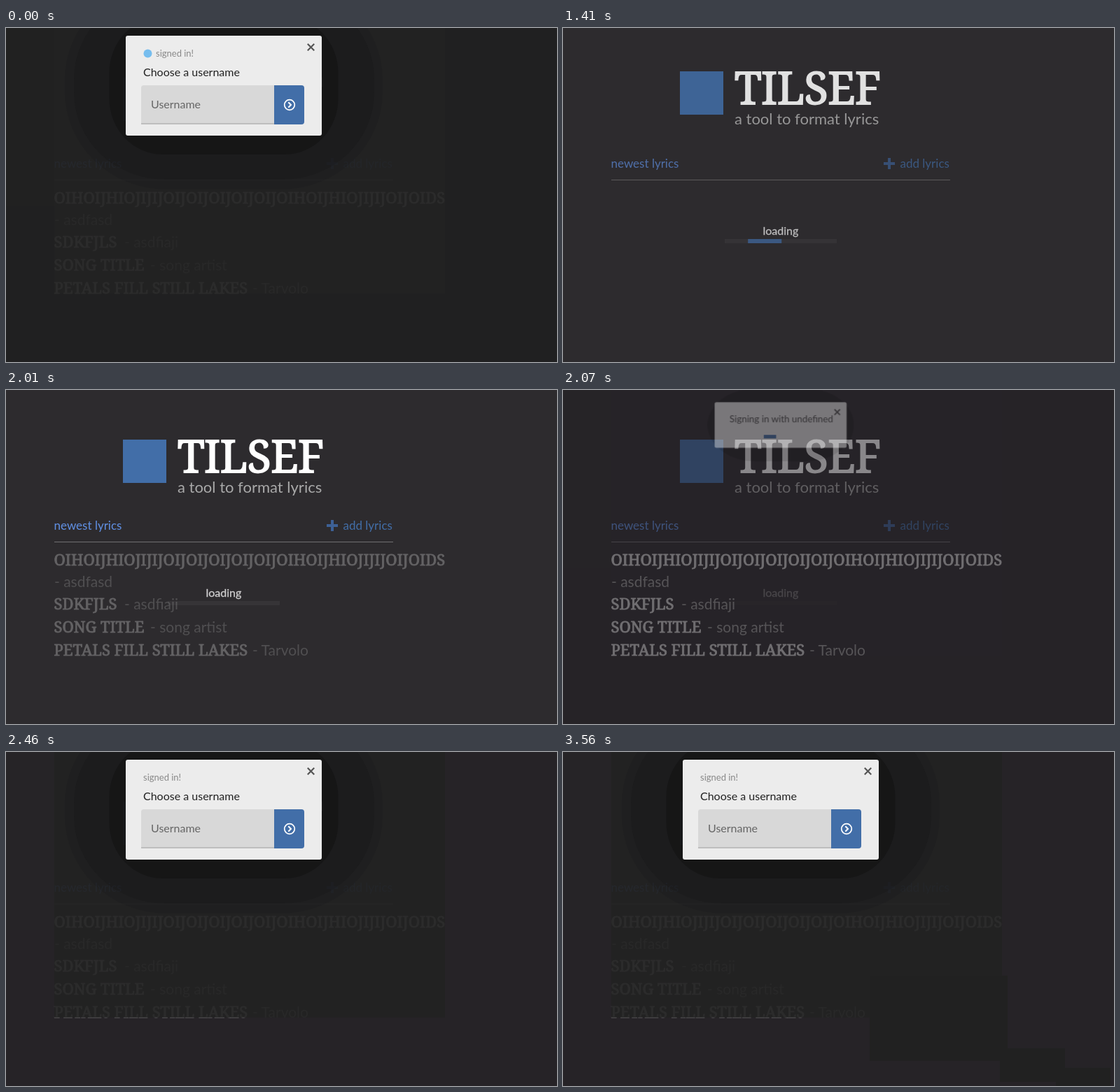
An HTML page for the animation above (4490 ms loop, 787 px wide and 478 px high).

```html
<!DOCTYPE html>
<html lang="en">
<head>
<meta charset="utf-8">
<title>Lyrics sign-in</title>
<style>
html, body { margin: 0; width: 100%; height: 100%; overflow: hidden; background: #2d2b2e; }
svg { display: block; width: 787px; height: 478px; font-family: Lato, sans-serif; font-size: 16px; }
svg * { animation: 4.49s linear infinite; }

.brand { font: 63px "Noto Serif", serif; letter-spacing: -.5px; fill: #fff; stroke: #fff; stroke-width: 1.8px; }
.tag { font-size: 22px; fill: #a9a9a9; }
.row { font-size: 17px; }
.song { font: 22px "Noto Serif", serif; fill: #d3d3d3; stroke: #d3d3d3; stroke-width: .9px; }
.artist { font-size: 21px; fill: #999; }
.blue { fill: #426ea8; }
.icon { fill: none; stroke: #555; stroke-width: 2.2px; }

#header { animation-name: drop; }
#bar { animation-name: appear; }
#loader { animation-name: load; }
#block { animation-name: slide; }
#songs { animation-name: list; }
#shade { animation-name: shade; }
#edge { animation-name: edge; }
#signing { animation-name: signing; transform-origin: 311px 50px; }
#halo { animation-name: halo; }
#fill { animation-name: fill; transform-origin: 282px 70px; }
#choose { animation-name: choose; transform-origin: 311px 82px; }
#badge, #status, #cursor, .trail { animation-timing-function: step-end; }
#badge { animation-name: badge; }
#status { animation-name: status; }
#cursor { animation-name: cursor; }
.trail { fill: #212121; }
#t1 { animation-name: trail1; }
#t2 { animation-name: trail2; }
#t3 { animation-name: trail3; }

@keyframes drop {
  0%, 23.6% { opacity: 1; transform: none; }
  23.61%, 25.61% { opacity: 0; transform: translateY(-64px); animation-timing-function: ease-out; }
  34.08%, 100% { opacity: 1; transform: none; }
}
@keyframes appear {
  0%, 23.6% { opacity: 1; }
  23.61%, 25.61% { opacity: 0; }
  34.08%, 100% { opacity: 1; }
}
@keyframes load {
  0%, 25.61% { opacity: 0; }
  34.08%, 44.1% { opacity: 1; }
  46.1%, 46.98% { opacity: .34; }
  47.88%, 100% { opacity: 0; }
}
@keyframes slide {
  0%, 23.61% { transform: translateX(-48px); }
  42.76%, 44.1% { transform: translateX(151px); }
  44.11%, 100% { transform: translateX(160px); }
}
@keyframes list {
  0%, 23.6% { opacity: 1; }
  23.61%, 44.1% { opacity: 0; }
  46.1%, 46.98% { opacity: .95; }
  47.88%, 100% { opacity: 1; }
}
@keyframes shade {
  0%, 23.6% { opacity: .94; fill: #212121; }
  23.61%, 45.21% { opacity: 0; fill: #201e22; }
  46.1%, 46.98% { opacity: .53; fill: #201e22; }
  47%, 47.88% { opacity: .75; fill: #212121; }
  48.77%, 100% { opacity: .94; fill: #212121; }
}
@keyframes edge {
  0%, 23.6% { opacity: .94; fill: #212121; }
  23.61%, 45.21% { opacity: 0; fill: #201e22; }
  46.1%, 100% { opacity: .53; fill: #201e22; }
}
@keyframes signing {
  0%, 45.21% { opacity: 0; transform: scale(.7); }
  46.1%, 46.98% { opacity: .42; transform: scale(.836); }
  47% { opacity: .75; transform: scale(.95); }
  48.77%, 50.33% { opacity: 1; transform: none; }
  52.5%, 100% { opacity: 0; transform: none; }
}
@keyframes halo {
  0%, 46.98% { opacity: 0; }
  48.77%, 100% { opacity: 1; }
}
@keyframes fill {
  0%, 45.21% { transform: scaleX(0); }
  46.1%, 46.98% { transform: scaleX(.44); }
  48.77%, 49.44% { transform: none; }
  51.5%, 100% { transform: scaleX(1.2); }
}
@keyframes choose {
  0%, 23.6% { opacity: 1; transform: none; }
  23.61%, 50.33% { opacity: 0; transform: scale(.8); animation-timing-function: ease-out; }
  54.78%, 100% { opacity: 1; transform: none; }
}
@keyframes badge { 0% { opacity: 1; } 23.61%, 100% { opacity: 0; } }
@keyframes status { 0% { transform: translateX(18px); } 23.61%, 100% { transform: none; } }
@keyframes cursor {
  0% { opacity: 0; transform: translate(269px, 50px); }
  69.26% { opacity: 1; transform: translate(269px, 50px); }
  70.27% { opacity: 1; transform: translate(270px, 56px); }
  71.27% { opacity: 1; transform: translate(273px, 72px); }
  72.27% { opacity: 1; transform: translate(278px, 102px); }
  73.28% { opacity: 1; transform: translate(287px, 154px); }
  74.28% { opacity: 1; transform: translate(361px, 205px); }
  75.28% { opacity: 1; transform: translate(438px, 320px); }
  76.28% { opacity: 1; transform: translate(623px, 423px); }
  77.28% { opacity: 1; transform: translate(705px, 451px); }
  78.29% { opacity: 1; transform: translate(769px, 466px); }
  79.28%, 100% { opacity: 0; transform: translate(769px, 466px); }
}
@keyframes trail1 { 0% { opacity: 0; } 76.28%, 100% { opacity: 1; } }
@keyframes trail2 { 0% { opacity: 0; } 77.28%, 100% { opacity: 1; } }
@keyframes trail3 { 0% { opacity: 0; } 78.29%, 100% { opacity: 1; } }
</style>
</head>
<body>
<svg viewBox="0 0 787 478">
  <defs>
    <clipPath id="track"><rect x="231" y="302" width="160" height="6"/></clipPath>
    <path id="close" d="M-4.7 -4.7 4.7 4.7M-4.7 4.7 4.7 -4.7"/>
  </defs>

  <!-- page -->
  <g id="header">
    <rect class="blue" x="167" y="71" width="62" height="62"/>
    <text class="brand" x="245" y="118">TILSEF</text>
    <text class="tag" x="245" y="147">a tool to format lyrics</text>
  </g>
  <g id="bar" class="row">
    <text x="68.5" y="200" fill="#6090e4">newest lyrics</text>
    <path d="M464 186h4v6h6v4h-6v6h-4v-6h-6v-4h6z" fill="#3d6095"/>
    <text x="481.5" y="200" fill="#426ea8">add lyrics</text>
    <rect x="69" y="217" width="484" height="1" fill="#706f71"/>
  </g>
  <g id="loader">
    <text x="285.5" y="296" fill="#fff" stroke="#fff" stroke-width=".3">loading</text>
    <rect x="231" y="302" width="160" height="6" fill="#3a383b"/>
    <g clip-path="url(#track)"><rect id="block" class="blue" x="231" y="302" width="48" height="6"/></g>
  </g>
  <g id="songs">
    <text class="song" x="68.5" y="251" letter-spacing=".03">OIHOIJHIOJIJIJOIJOIJOIJOIJOIJOIHOIJHIOJIJIJOIJOIDS</text>
    <text class="artist" x="69" y="282">- asdfasd</text>
    <text class="song" x="68.5" y="314">SDKFJLS</text>
    <text class="artist" x="169" y="314">- asdfiaji</text>
    <text class="song" x="68.5" y="347">SONG TITLE</text>
    <text class="artist" x="206" y="347">- song artist</text>
    <text class="song" x="68.5" y="380">PETALS FILL STILL LAKES</text>
    <text class="artist" x="352" y="380">- Tarvolo</text>
  </g>

  <!-- dimming -->
  <rect id="shade" x="69" width="558" height="380"/>
  <path id="edge" d="M0 0H69V380H627V0H787V478H0z"/>
  <rect id="t1" class="trail" x="438" y="320" width="197" height="122"/>
  <rect id="t2" class="trail" x="624" y="424" width="93" height="48"/>
  <rect id="t3" class="trail" x="704" y="452" width="78" height="26"/>

  <!-- dialogs -->
  <g id="signing">
    <rect id="halo" x="135" y="-58" width="352" height="216" rx="140" ry="108" fill-opacity=".15"/>
    <rect x="186" y="-12" width="250" height="124" rx="80" ry="62" fill-opacity=".26"/>
    <rect x="198" y="11" width="225.500" height="78" rx="3" fill="#ececec"/>
    <text x="223.500" y="45" fill="#444">Signing in with undefined</text>
    <use href="#close" class="icon" x="407.500" y="28"/>
    <rect id="fill" class="blue" x="282" y="67" width="48" height="6"/>
  </g>
  <g id="choose">
    <rect x="84" y="-66" width="454" height="297" rx="145" ry="140" fill="#10121c" fill-opacity=".12"/>
    <rect x="97" y="-52" width="429" height="269" rx="130" ry="125" fill-opacity=".11"/>
    <rect x="147.500" y="-16" width="327" height="197" rx="76" ry="80" fill-opacity=".22"/>
    <rect x="171" y="11" width="280" height="143" rx="3" fill="#ececec"/>
    <circle id="badge" cx="202.500" cy="36.500" r="6" fill="#76bdee"/>
    <text id="status" x="196" y="41" font-size="13" fill="#888">signed in!</text>
    <text x="196" y="69" fill="#222">Choose a username</text>
    <use href="#close" class="icon" x="435.500" y="27.500"/>
    <path d="M383 82H197q-4 0-4 4V138H383z" fill="#d8d8d8"/>
    <rect x="193" y="136" width="190" height="2" fill="#bebebe"/>
    <text x="207" y="115" fill="#666">Username</text>
    <path class="blue" d="M383 82h39q4 0 4 4v48q0 4-4 4h-39z"/>
    <g fill="none" stroke="#fff" stroke-width="1.7">
      <circle cx="405" cy="110" r="7.300"/>
      <path d="M403.300 106.300 407 110 403.300 113.700" stroke-width="2"/>
    </g>
  </g>

  <path id="cursor" d="M.5.5V17L4.300 13.500 6.800 19.300 9.300 18.200 6.900 12.500H12z" fill="#fff" stroke="#000"/>
</svg>
</body>
</html>
```
